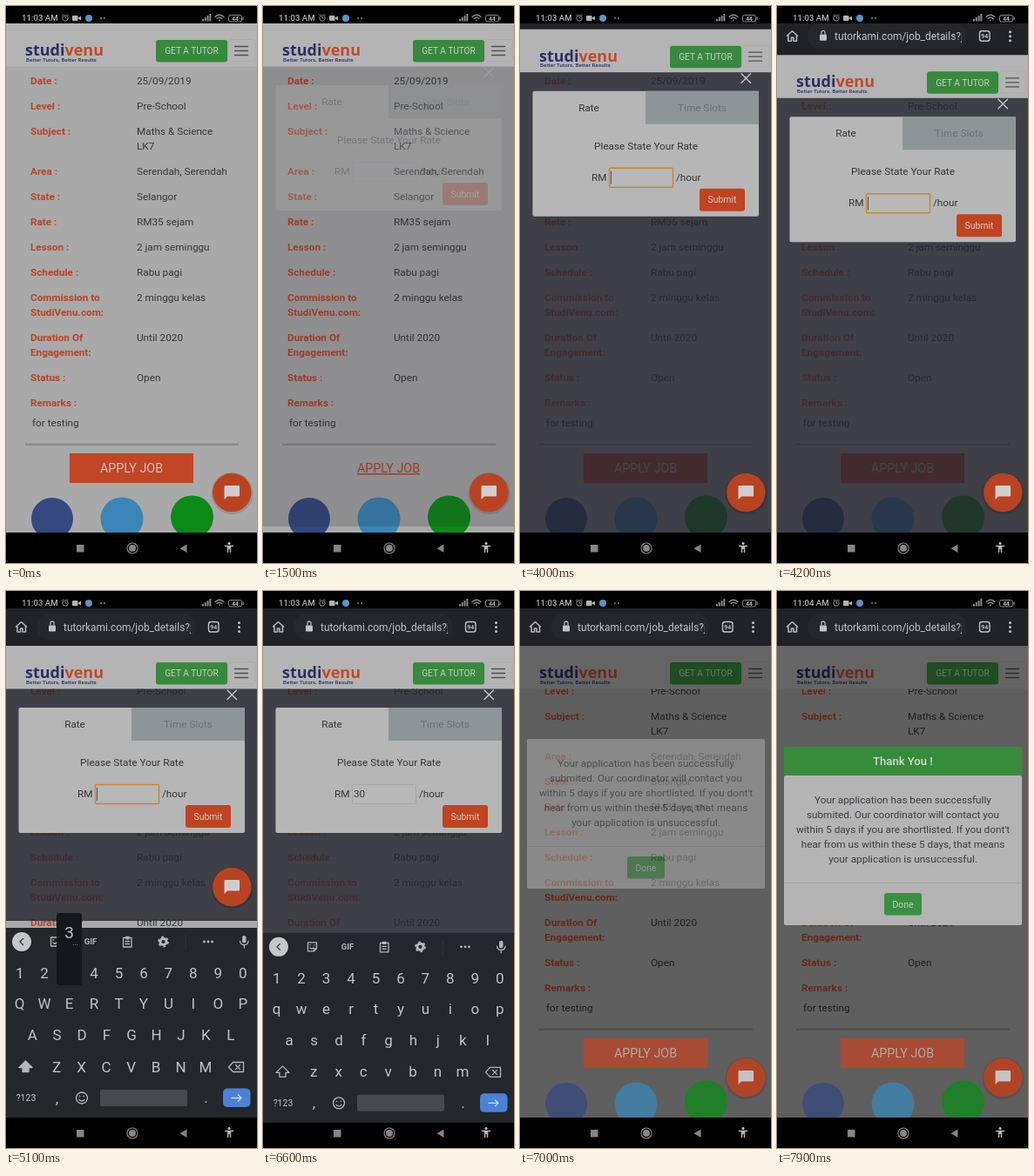
These frames come from a looping animation (288 px wide and 640 px high, 8000 ms). An HTML page:

```html
<!DOCTYPE html>
<html lang="en">
<head>
<meta charset="utf-8">
<title>Job application on a phone</title>
<style>
  html, body { margin: 0; width: 100%; height: 100%; overflow: hidden; background: #000; }
  svg { display: block; width: 288px; height: 640px; font-family: Roboto, sans-serif; }
  .line { fill: none; stroke: #b4b6b8; stroke-width: 1.3; stroke-linecap: round; stroke-linejoin: round; }
</style>
</head>
<body>
<svg id="stage" viewBox="0 0 288 640"></svg>
<script>
const ORANGE = '#b94425', INK = '#34363a', PALE = '#c0c2c4', GREEN = '#37893d', DIM = '#8e8e8e';
const TOP = 20, BOTTOM = 605, BAR = 43, HEADER = 49.5;

// y is the middle of the capitals
function text(x, y, string, { size = 11.75, fill = INK, weight = 400, anchor = 'start', more = '' } = {}) {
  return `<text x="${x}" y="${y + size * 0.355}" font-size="${size}" fill="${fill}" font-weight="${weight}" text-anchor="${anchor}" ${more}>${string}</text>`;
}
const centred = (x, y, string, options) => text(x, y, string, { anchor: 'middle', ...options });
const rect = (x, y, w, h, fill, r = 0, more = '') =>
  `<rect x="${x}" y="${y}" width="${w}" height="${h}" fill="${fill}" rx="${r}" ${more}/>`;
const circle = (x, y, r, fill, more = '') => `<circle cx="${x}" cy="${y}" r="${r}" fill="${fill}" ${more}/>`;
const line = (d, more = '') => `<path class="line" d="${d}" ${more}/>`;
const group = (id, ...parts) => `<g id="${id}">${parts.join('')}</g>`;
const screen = (id, fill) => rect(0, TOP, 288, BOTTOM - TOP, fill, 0, `id="${id}"`);

const details = [
  [86, 'Date :', '25/09/2019'],
  [115, 'Level :', 'Pre-School'],
  [144, 'Subject :', 'Maths &amp; Science', '', 'LK7'],
  [190, 'Area :', 'Serendah, Serendah'],
  [219, 'State :', 'Selangor'],
  [248, 'Rate :', 'RM35 sejam'],
  [277, 'Lesson :', '2 jam seminggu'],
  [306, 'Schedule :', 'Rabu pagi'],
  [335, 'Commission to', '2 minggu kelas', 'StudiVenu.com:'],
  [381, 'Duration Of', 'Until 2020', 'Engagement:'],
  [427, 'Status :', 'Open'],
  [456, 'Remarks :', '']
];

function page() {
  const rows = details.map(([y, label, value, label2 = '', value2 = '']) =>
    text(28, y, label, { fill: ORANGE, weight: 700 }) + text(28, y + 17, label2, { fill: ORANGE, weight: 700 }) +
    text(150, y, value) + text(150, y + 17, value2));
  return group('page',
    screen('paper', '#a9a9a9'), ...rows,
    text(30, 479, 'for testing'),
    rect(22, 502.5, 245, 2.5, '#8a8a8a'));
}

function actions() {
  return group('actions',
    rect(73, 514, 142, 34, '#c04625', 0, 'id="applyBox"'),
    centred(144, 531, 'APPLY JOB', { size: 14.3, id: 'applyText', more: 'id="applyText"' }),
    circle(53, 589, 24, '#34497f'), circle(133, 589, 24.5, '#3a86b8'), circle(213.5, 587, 24.5, '#0b8a18'));
}

function header() {
  return group('header',
    rect(0, TOP, 288, HEADER, '#b4b4b4'),
    `<text x="22" y="57" font-size="18" font-weight="700" font-family="'Open Sans', sans-serif" fill="#2a2f66">studi<tspan fill="#c04a2a">venu</tspan></text>`,
    text(23, 61.5, 'Better Tutors, Better Results', { size: 6.2, fill: '#2a2f66', weight: 500, more: 'letter-spacing=".1"' }),
    rect(172, 39, 82, 25.5, GREEN, 3),
    centred(213, 51.8, 'GET A TUTOR', { size: 10.1, fill: '#c6d0c6' }),
    rect(255, 38.5, 31, 25, 'none', 3, 'stroke="#a6a6a6" stroke-width=".6"'),
    line('M262.500 46.500h15M262.500 51.500h15M262.500 56.500h15', 'style="stroke:#505050;stroke-width:1.3"'));
}

function rateModal() {
  return group('rateModal',
    line('M254 71l10.500 10.500M264.500 71l-10.500 10.500', 'style="stroke:#c8c8c8"'),
    rect(14.5, 91, 259.5, 144, '#b6b6b6', 2),
    rect(144, 91, 130, 38, '#8d9597'),
    centred(79, 110, 'Rate'), centred(209, 110, 'Time Slots', { fill: '#697175' }),
    centred(144.5, 154, 'Please State Your Rate'),
    text(82, 190, 'RM'), text(179, 190, '/hour'),
    rect(102.5, 179.5, 73, 22, '#b8b8b8', 1, 'id="input"'),
    text(104, 190, '', { more: 'id="amount"' }),
    rect(104, 183, 1, 15, '#5a4a50', 0, 'id="caret"'),
    rect(206, 203, 52, 26, '#c04322', 3),
    centred(232, 216, 'Submit', { size: 10.5, fill: '#d4c8c4' }));
}

function chatButton() {
  return group('chat',
    circle(259.5, 560, 24, '#000', 'opacity=".12"'),
    circle(259.3, 559, 22.2, '#b94320'),
    '<path d="M251.500 551h15.500q1 0 1 1v10.500q0 1-1 1h-13l-3.500 3.500v-15q0-1 1-1z" fill="#cfcfcf"/>');
}

function thankYou() {
  const message = ['Your application has been successfully', 'submited. Our coordinator will contact you',
    "within 5 days if you are shortlisted. If you dont't", 'hear from us within these 5 days, that means',
    'your application is unsuccessful.'];
  return group('thanks',
    rect(8, 212, 273, 172, '#b4b4b4', 2),
    group('thanksTitle', rect(8, 179, 273, 33, '#378c3b', 2),
      centred(144.5, 195.5, 'Thank You !', { size: 13.1, fill: '#d0dad0', weight: 500 })),
    ...message.map((words, i) => centred(144.5, 240 + 17 * i, words, { fill: '#3b3d42' })),
    rect(8, 335, 273, 1, '#a2a2a2'),
    rect(123, 347, 43, 25.5, '#3a9040', 3),
    centred(144.5, 360, 'Done', { size: 10.4, fill: '#c8d2c8' }));
}

function toolbar() {
  return group('toolbar',
    rect(0, TOP, 288, BAR, '#202226'), rect(35, 26, 183, 30, '#25272b', 15),
    line('M11.500 41l6-5.500 6 5.500M13 40.500v6.500h3.500v-4h2.500v4h3.500v-6.500', 'style="stroke-width:1.6"'),
    rect(49, 39.5, 8, 7, PALE, 1), line('M51 39v-2a2 2 0 0 1 4 0v2'),
    `<svg x="66" y="26" width="146" height="30">${text(0, 15.5, 'tutorkami.com/job_details?j', { size: 11.9, fill: PALE })}</svg>`,
    rect(232.5, 35.5, 11.5, 11.5, 'none', 2.5, 'stroke="#c0c2c4" stroke-width="1.4"'),
    centred(238.2, 41.3, '94', { size: 7, fill: PALE, weight: 700 }),
    ...[36.5, 41.5, 46.5].map(y => circle(267.5, y, 1.5, PALE)));
}

function keyboard() {
  const row = (keys, x, y) => [...keys].map((key, i) =>
    centred(x + 28.45 * i, y, key, { size: 17, fill: PALE, more: /[A-Z]/.test(key) ? 'class="letter"' : '' })).join('');
  return group('keyboard',
    rect(0, 387, 288, BOTTOM - 387, '#24272b'),
    circle(18, 403, 11, '#c4c6c8'), line('M19.500 399.500l-3.500 3.500 3.500 3.500', 'style="stroke:#333"'),
    line('M51.500 398h10v7l-3 3h-7zM58.500 408v-3h3M54 401h.5M58.500 401h.5M54 404q2 2 4 0'),
    centred(97, 403, 'GIF', { size: 9.5, fill: '#b4b6b8', weight: 700 }),
    line('M134.500 398.500h9.500v10.500h-9.500zM137.500 397.500h3.500v2h-3.500zM137 402.500h4.500M137 405.500h4.500'),
    circle(180.5, 403, 3.6, 'none', 'stroke="#b4b6b8" stroke-width="3"'),
    circle(180.5, 403, 5.4, 'none', 'stroke="#b4b6b8" stroke-width="2" stroke-dasharray="2.6 3.05"'),
    rect(205.5, 395, 1, 17, '#34373b'),
    ...[227.5, 232, 236.5].map(x => circle(x, 403, 1.4, '#b4b6b8')),
    rect(271, 396, 4.5, 8.5, '#b4b6b8', 2.2), line('M268.500 402.500a4.800 4.800 0 0 0 9.500 0M273.200 407.500v2.500'),
    row('1234567890', 15.7, 439), row('QWERTYUIOP', 15.7, 474), row('ASDFGHJKL', 30.2, 510), row('ZXCVBNM', 58.2, 546.5),
    line('M22.500 540l7.500 7.500h-4v5h-7v-5h-4z', 'id="shift"'),
    line('M260.500 541.500h12v11h-12l-5-5.500zM263.500 544.500l5 5M268.500 544.500l-5 5'),
    centred(23, 582.5, '?123', { size: 10.5, fill: PALE }), centred(58.5, 582.5, ',', { size: 17, fill: PALE }),
    line('M93.500 582.500a6.500 6.500 0 1 1-13 0a6.500 6.500 0 1 1 13 0zM84.500 580.500h.3M89.200 580.500h.3M84 584.500q3 3 6 0'),
    rect(108, 573, 100, 19, '#46494d', 2), centred(229.5, 582, '.', { size: 17, fill: PALE }),
    rect(249, 571.5, 31.5, 21.5, '#4a82d6', 5), line('M259 582.500h11M266.500 579l3.500 3.500-3.500 3.500', 'style="stroke:#d0d9e8"'),
    group('popup', rect(-14.5, 370, 29, 83, '#15171a', 3),
      centred(0, 392, '', { size: 19, fill: PALE, more: 'id="popupKey"' }), centred(7, 404, '...', { size: 8, fill: PALE })));
}

function statusBar() {
  return rect(0, 0, 288, TOP, '#000') +
    text(18, 14, '', { size: 9.6, fill: '#b4b4b4', weight: 500, more: 'id="clock"' }) +
    circle(68, 14, 3.2, 'none', `stroke="${DIM}"`) + line('M68 12v2h1.500M64.500 11l1.500-1.500M71.500 11l-1.500-1.500', `style="stroke:${DIM};stroke-width:.9"`) +
    rect(76, 11, 6.5, 6, '#b4b4b4', 1) + '<path d="M82 14l4-2.500v5z" fill="#b4b4b4"/>' +
    circle(95, 14, 4, '#5b93c8') + circle(109, 14, 0.9, DIM) + circle(113, 14, 0.9, DIM) +
    [0, 1, 2, 3].map(i => rect(225 + i * 2.8, 15 - i * 2, 1.9, 2.5 + i * 2, DIM)).join('') +
    line('M240 12.500q5-4.500 10 0M242 14.500q3-2.500 6 0M244.700 16.500h.5', `style="stroke:${DIM}"`) +
    rect(255.5, 10.5, 15, 7.5, 'none', 2, `stroke="${DIM}"`) + rect(271.5, 12.5, 1.2, 3.5, DIM) +
    centred(263, 14.3, '44', { size: 6.5, fill: '#b4b4b4', weight: 700 });
}

function navigationIcons() {
  return rect(81, 619, 8.5, 8.5, '#858585') +
    circle(145, 623, 6, 'none', 'stroke="#858585" stroke-width="1.2"') + circle(145, 623, 4, '#858585') +
    '<path d="M207.500 618.500v9.500l-8-4.700z" fill="#858585"/>' +
    circle(256, 617.5, 1.5, '#c4c4c4') + line('M251.500 620.500h9M256 620.500v3M254.500 621v6.500M257.500 621v6.500', 'style="stroke-width:1.5"');
}

// The keyboard slides over the black navigation strip, below its icons.
document.getElementById('stage').innerHTML =
  page() + header() + screen('backdrop', '#000') + actions() + screen('shade', '#24252f') + rateModal() +
  chatButton() + thankYou() + toolbar() + statusBar() +
  rect(0, BOTTOM, 288, 640 - BOTTOM, '#000') + keyboard() + navigationIcons();

const el = id => document.getElementById(id);
const set = (id, attributes) => Object.entries(attributes).forEach(([name, value]) => el(id).setAttribute(name, value));
const shift = (id, y, x = 0) => set(id, { transform: `translate(${x} ${y})` });
const letters = [...document.querySelectorAll('.letter')].map(node => ({ node, upper: node.textContent }));
const progress = (t, from, to) => Math.min(1, Math.max(0, (t - from) / (to - from)));
const easeOut = p => 1 - (1 - p) ** 2;
const easeInOut = p => p * p * (3 - 2 * p);

function draw(t) {
  const hovered = t >= 1100 && t < 3700;
  set('applyBox', { opacity: hovered ? 0 : 1 });
  set('applyText', { fill: hovered ? ORANGE : '#cdc1bd', 'text-decoration': hovered ? 'underline' : 'none' });

  const barY = BAR * easeInOut(progress(t, 3900, 4300));
  shift('toolbar', barY - BAR);
  shift('header', barY);
  shift('rateModal', barY);

  const rateShown = progress(t, 1400, 1800) * (1 - progress(t, 6650, 6850));
  const keysOpen = t >= 4400 && t < 6550;
  const shadeTop = TOP + HEADER + barY;
  const shadeEnd = keysOpen ? 379 : barY ? BOTTOM : 598;
  set('shade', { opacity: 0.8 * rateShown, y: shadeTop, height: shadeEnd - shadeTop });
  set('rateModal', { opacity: rateShown });

  const focused = t >= 3900 && t < 6500;
  const amount = t < 5200 ? '' : t < 5600 ? '3' : '30';
  el('amount').textContent = amount;
  set('input', { stroke: focused ? '#c98632' : '#a2a2a2', 'stroke-width': focused ? 1.4 : 0.8 });
  set('caret', { opacity: focused ? 1 : 0, x: 104 + 6.6 * amount.length });

  const keysDown = 1 - easeOut(progress(t, 4250, 4550)) + progress(t, 6550, 6880) ** 2;
  shift('keyboard', 255 * keysDown);
  shift('chat', keysOpen ? -219 : 0);
  const capitals = t < 5200;
  letters.forEach(({ node, upper }) => node.textContent = capitals ? upper : upper.toLowerCase());
  el('shift').style.fill = capitals ? '#b4b6b8' : 'none';
  const pressed = t >= 5000 && t < 5200 ? '3' : t >= 5500 && t < 5700 ? '0' : '';
  el('popupKey').textContent = pressed;
  set('popup', { opacity: pressed ? 1 : 0 });
  shift('popup', 0, pressed === '0' ? 272 : 72.5);

  const dimmed = progress(t, 6850, 7000);
  set('backdrop', { opacity: 0.44 * dimmed });
  set('actions', { opacity: 1 - 0.25 * dimmed });
  set('chat', { opacity: 1 - 0.1 * dimmed });
  set('thanks', { opacity: progress(t, 6920, 7080) });
  set('thanksTitle', { opacity: progress(t, 7000, 7100) });
  shift('thanks', -50 * (1 - easeOut(progress(t, 6975, 7275))));
  el('clock').textContent = t < 7600 ? '11:03 AM' : '11:04 AM';
}

const start = performance.now();
function frame() {
  const t = (performance.now() - start) % 8000;
  draw(Math.floor(t / 100) * 100);
  requestAnimationFrame(frame);
}
frame();
</script>
</body>
</html>
```
